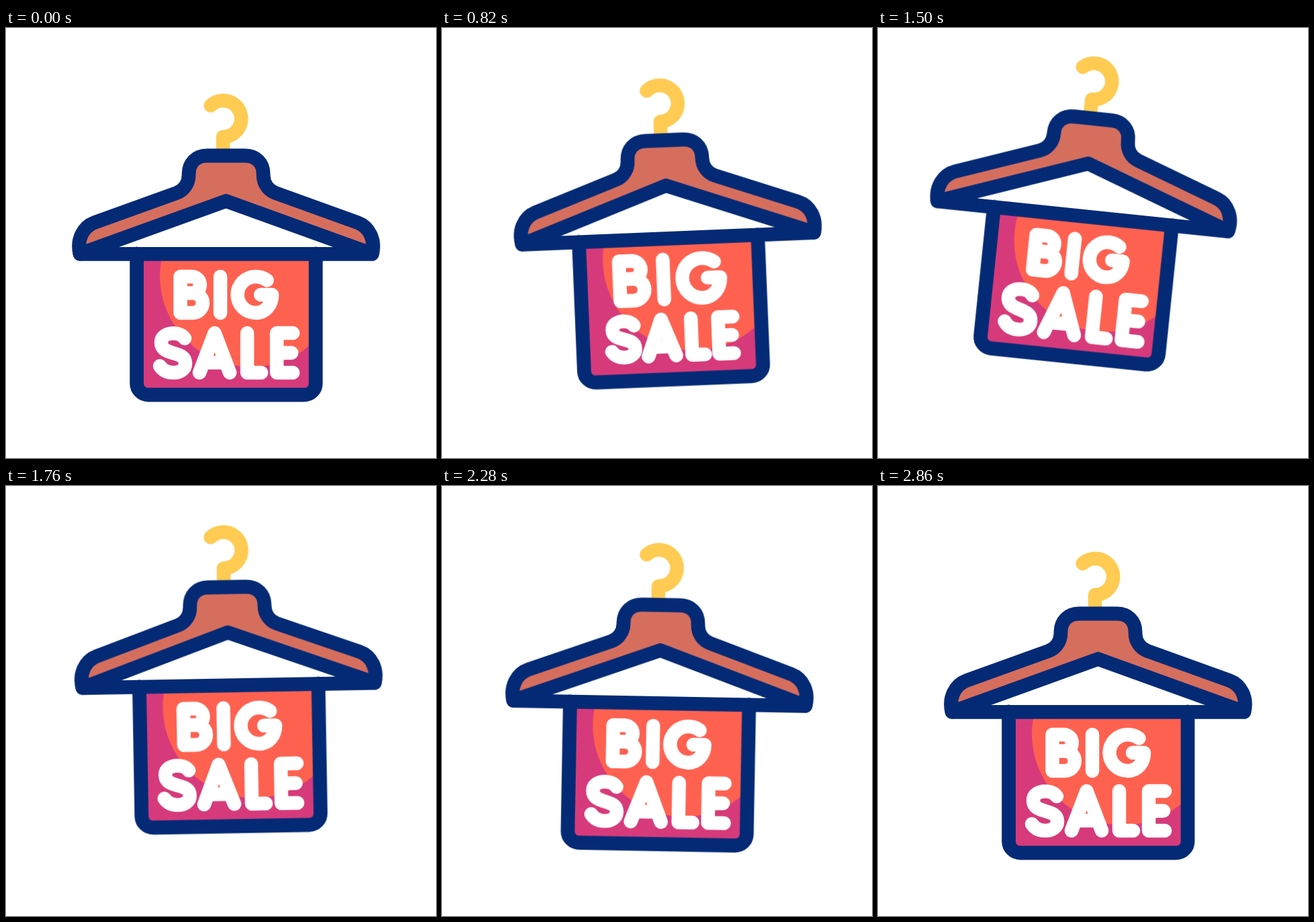
Recreate the animation shown at these times as an HTML page. Size 640x640 px, loop 3 s.

```html
<!DOCTYPE html>
<html lang="en">
<head>
<meta charset="utf-8">
<title>Big sale hanger</title>
<style>
  html, body { margin: 0; width: 100%; height: 100%; overflow: hidden; background: #fff; }
  svg { display: block; width: 100%; height: 100%; }

  .line { fill: none; stroke-width: 20.5; stroke-linecap: round; stroke-linejoin: round; }
  .navy { stroke: #042a76; stroke-width: 20.8; }
  .hook { stroke: #ffcb52; }
  .word { stroke: #fff; }
  .word path { vector-effect: non-scaling-stroke; }

  .lift, .swing, .word { animation: 3s linear infinite; }
  .lift { animation-name: lift; }
  .swing { animation-name: swing; transform-origin: 323px 116px; }
  .big { animation-name: big; transform-origin: 327.7px 397px; }
  .sale { animation-name: sale; transform-origin: 328px 483.5px; }

  @keyframes lift {
    0%, 2.667% { transform: translateY(0); animation-timing-function: cubic-bezier(.3, .05, .7, .55); }
    48.667% { transform: translateY(-58px); animation-timing-function: cubic-bezier(.3, .45, .65, .97); }
    94.667%, 100% { transform: translateY(0); }
  }

  @keyframes swing {
    0% { transform: rotate(0deg); }
    2.667% { transform: rotate(0deg); animation-timing-function: cubic-bezier(.3, 0, .75, .7); }
    18% { transform: rotate(8.7deg); animation-timing-function: cubic-bezier(.2, .05, .8, .95); }
    33.333% { transform: rotate(-8.8deg); animation-timing-function: cubic-bezier(.2, .05, .8, .95); }
    48.667% { transform: rotate(6.5deg); animation-timing-function: cubic-bezier(.2, .05, .8, .95); }
    64% { transform: rotate(-4.5deg); animation-timing-function: cubic-bezier(.2, .05, .8, .95); }
    79.333% { transform: rotate(2.2deg); animation-timing-function: cubic-bezier(.3, .1, .6, 1); }
    94.667%, 100% { transform: rotate(0deg); }
  }

  /* The two words pulse in opposite directions, then settle. */
  .big, .sale { animation-timing-function: cubic-bezier(.33, 0, .67, 1); }
  @keyframes big {
    0%, 2.667%, 53.333%, 100% { transform: scale(1); }
    15.333%, 40.667% { transform: scale(.82); }
    28% { transform: scale(1.1); }
  }
  @keyframes sale {
    0%, 2.667%, 53.333%, 100% { transform: scale(1); }
    15.333%, 40.667% { transform: scale(1.066, 1.19); }
    28% { transform: scale(.915, .92); }
  }
</style>
</head>
<body>
<svg viewBox="0 0 640 640" role="img" aria-label="BIG SALE">
  <defs>
    <clipPath id="panel"><rect x="195" y="336" width="266" height="210" rx="17"/></clipPath>
  </defs>
  <g class="lift">
    <g class="swing">
      <path class="line hook" d="M304.5 115.5A27 27 0 1 1 323 162V184"/>

      <g clip-path="url(#panel)">
        <rect x="195" y="336" width="266" height="210" fill="#d63a7b"/>
        <circle cx="364.5" cy="369" r="135.5" fill="#ff6150"/>
      </g>
      <path class="line navy" d="M194.6 336V529A17 17 0 0 0 211.6 546H444A17 17 0 0 0 461 529V336"/>

      <path class="line navy" style="fill:#d66e5e" d="M110 336
        C105 316 114 296 132 289.5L254 245.5
        C265 241.5 272 231 272 219V217C272 201 283 190 299 190
        H356C372 190 383 201 383 217V219C383 231 390 241.5 401 245.5
        L523 289.5C541 296 550 316 545 336L327.5 257.5Z"/>
      <path class="line navy" d="M110 336.3H545"/>

      <g class="line word big">
        <path d="M259.5 370H276.5A12.25 12.25 0 0 1 276.5 394.5H259.5M276.5 394.5H278A14.75 14.75 0 0 1 278 424H259.5V370"/>
        <path d="M319 370V424"/>
        <path d="M388.5 375.5C383 371.5 377.5 370 371.5 370A27 27 0 0 0 371.5 424C386 424 396 412 396 397H379"/>
      </g>
      <g class="line word sale">
        <path d="M266 462C262 456.5 255 454.5 249 454.5C238 454.5 231 460 231 468C231 489 267 479 267 499C267 508 259 513 249 513C240 513 233 509 229 503"/>
        <path d="M288 513L310.5 454L333 513M296 498H325"/>
        <path d="M359 454V513H380"/>
        <path d="M427 454H403V513H427M403 483.5H425"/>
      </g>
    </g>
  </g>
</svg>
</body>
</html>
```
